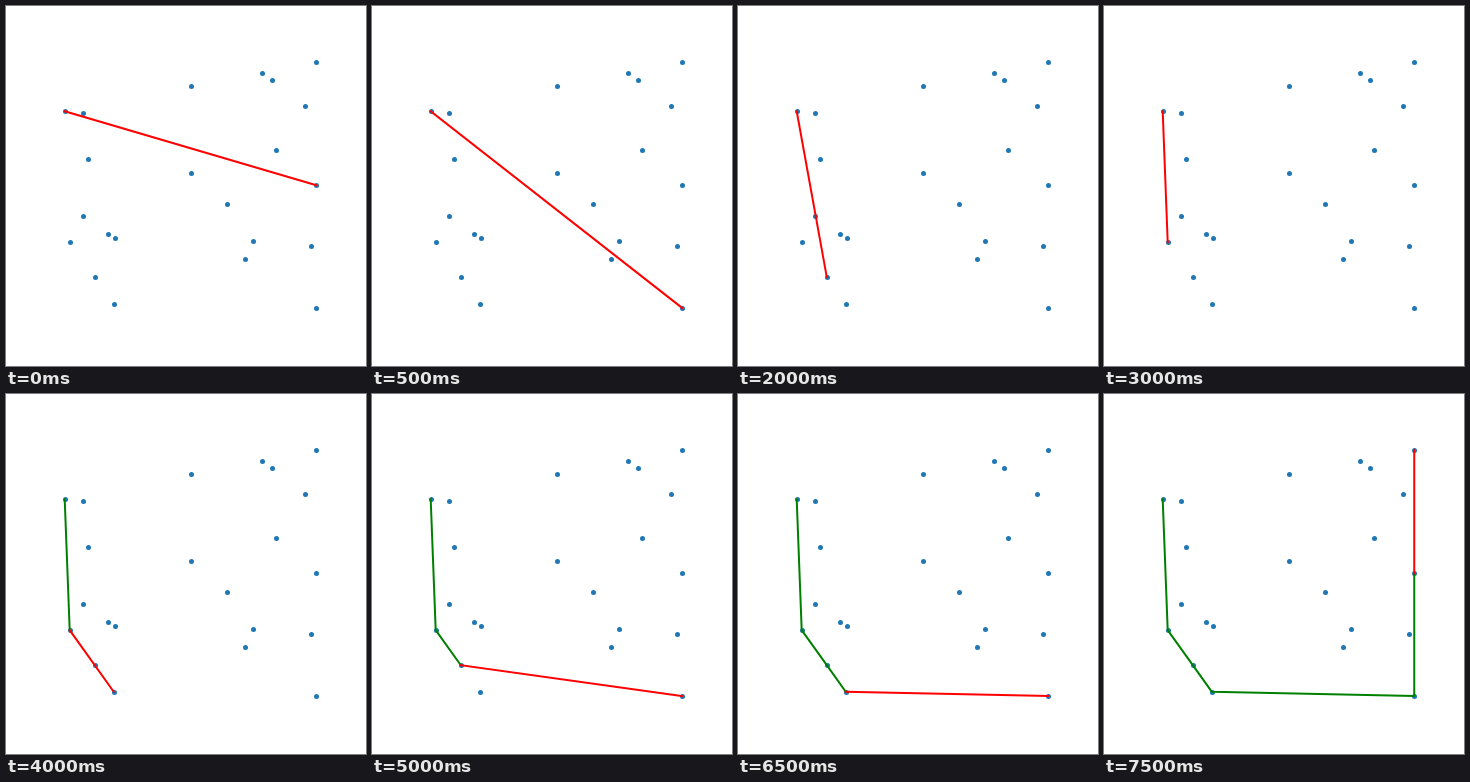
Animation of 360 by 360 pixels, one loop 8 s. Source, as an HTML page:

```html
<!DOCTYPE html>
<html lang="en">
<head>
<meta charset="utf-8">
<title>Gift wrapping</title>
<style>
  html, body { margin: 0; width: 100%; height: 100%; overflow: hidden; background: #fff; }
  svg { display: block; width: 100vw; height: 100vh; }
  #dots { fill: #1f77b4; }
  polyline { fill: none; stroke-width: 2; stroke-linecap: square; stroke-linejoin: round; }
  #hull { stroke: #008000; }
  #probe { stroke: #f00; }
</style>
</head>
<body>
<svg viewBox="0 0 360 360">
  <g id="dots"></g>
  <polyline id="hull"/>
  <polyline id="probe"/>
</svg>
<script>
  const STEP = 500;

  // Points that the search touches
  const P = {
    start: [58.7, 105.3],
    left: [63.7, 236.2],
    low: [88.8, 271.2],
    bottom: [107.7, 297.7],
    corner: [310.25, 302],
    right: [310.25, 179.2],
    top: [310.25, 56.2],
    near: [82, 153],
    mid: [77, 210]
  };
  const others = [
    [77, 107], [102, 228], [109, 232], [185, 80], [185, 167], [221, 198], [239, 253],
    [247, 235], [256, 67], [266, 74], [270, 144], [299, 100], [305, 240]
  ];

  // For each hull vertex in order, the candidates tried from it
  const search = [
    ["start", "right corner near bottom low mid left"],
    ["left", "corner bottom low"],
    ["low", "corner bottom"],
    ["bottom", "right corner"],
    ["corner", "right"],
    ["right", "top"]
  ];
  const vertices = search.map(([name]) => P[name]);
  const steps = search.flatMap(([, names], i) =>
    names.split(" ").map(name => ({ hull: vertices.slice(0, i + 1), to: P[name] })));

  const byId = id => document.getElementById(id);
  const setLine = (id, points) => byId(id).setAttribute("points", points.join(" "));

  // Dots sit on whole pixels, lines do not
  for (const [x, y] of [...Object.values(P), ...others]) {
    const dot = document.createElementNS("http://www.w3.org/2000/svg", "circle");
    dot.setAttribute("cx", Math.round(x) + 0.5);
    dot.setAttribute("cy", Math.round(y) + 0.5);
    dot.setAttribute("r", 2.5);
    byId("dots").append(dot);
  }

  let shown = -1;
  function draw() {
    const i = Math.floor(performance.now() / STEP) % steps.length;
    if (i !== shown) {
      const { hull, to } = steps[i];
      setLine("hull", hull.length > 1 ? hull : []);
      setLine("probe", [hull[hull.length - 1], to]);
      shown = i;
    }
    requestAnimationFrame(draw);
  }
  draw();
</script>
</body>
</html>
```
